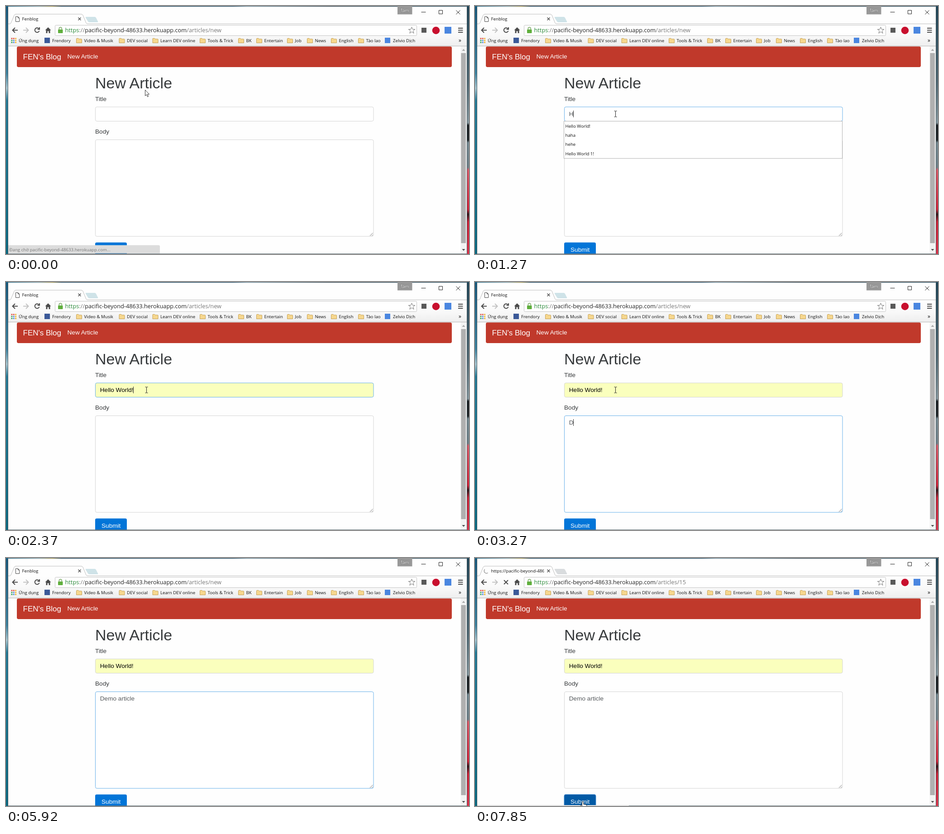
Write an HTML page that moves like this. It is 1023 px wide and 548 px high and loops after 7990 ms.

```html
<!DOCTYPE html>
<html lang="vi">
<head>
<meta charset="utf-8">
<title>Blog form</title>
<style>
  html, body { margin: 0; width: 100%; height: 100%; overflow: hidden; background: #fff; }
  svg { display: block; width: 100%; height: 100%; }
  text { white-space: pre; }
  .ui { font: 9.7px "Open Sans", "Noto Sans", sans-serif; fill: #111; }
  .url { font: 12.8px "Open Sans", "Noto Sans", sans-serif; fill: #777; }
  .page { font: 13.6px "Liberation Sans", Arial, sans-serif; fill: #373a3c; }
  .field { fill: #fff; stroke: #d4d4d4; stroke-width: 1; }
  .line { fill: none; stroke: #4a4a4a; }
</style>
</head>
<body>
<svg viewBox="0 0 1023 548" preserveAspectRatio="none">
  <defs>
    <linearGradient id="top">
      <stop offset="0" stop-color="#1d6f92"/><stop offset=".07" stop-color="#8fb5c0"/>
      <stop offset=".1" stop-color="#c2a340"/><stop offset=".12" stop-color="#123f5c"/>
      <stop offset=".49" stop-color="#1c4a66"/><stop offset=".52" stop-color="#7d9fb0"/>
      <stop offset=".7" stop-color="#33424c"/><stop offset="1" stop-color="#2b5568"/>
    </linearGradient>
    <linearGradient id="left" x2="0" y2="1">
      <stop offset="0" stop-color="#15567a"/><stop offset=".27" stop-color="#3a7f9c"/>
      <stop offset=".33" stop-color="#a5c2cc"/><stop offset=".38" stop-color="#237894"/>
      <stop offset="1" stop-color="#08677f"/>
    </linearGradient>
    <linearGradient id="right" x2="0" y2="1">
      <stop offset="0" stop-color="#1d4254"/><stop offset=".3" stop-color="#4d6570"/>
      <stop offset=".47" stop-color="#84959c"/><stop offset=".48" stop-color="#161a1d"/>
      <stop offset=".54" stop-color="#1d2225"/><stop offset=".55" stop-color="#74878f"/>
      <stop offset=".65" stop-color="#6d7f87"/><stop offset=".66" stop-color="#d65a68"/>
      <stop offset=".82" stop-color="#cf2339"/><stop offset=".84" stop-color="#2b1519"/>
      <stop offset=".87" stop-color="#c82237"/><stop offset="1" stop-color="#d83048"/>
    </linearGradient>
    <linearGradient id="bar" x2="0" y2="1">
      <stop offset="0" stop-color="#fefefe"/><stop offset=".5" stop-color="#f9f9f9"/>
      <stop offset="1" stop-color="#eeeeee"/>
    </linearGradient>
  </defs>

  <!-- desktop and window -->
  <rect width="1023" height="548" fill="url(#top)"/>
  <rect y="1" width="5" height="547" fill="url(#left)"/>
  <rect x="1018" y="1" width="5" height="547" fill="url(#right)"/>
  <rect x="4" y="1" width="1015" height="547" fill="#5b6b72"/>
  <rect x="5" y="1.5" width="1013" height="545.5" fill="#fefefe"/>

  <!-- title bar -->
  <rect x="865" width="32.500" height="18.500" fill="#989898"/>
  <text x="881" y="13" text-anchor="middle" class="ui" style="fill:#fff;stroke:#666;stroke-width:1;paint-order:stroke">Tâm</text>
  <path d="M917.500 13.500h10M956.500 9.500h8v8h-8zM994.500 9.500l9 9m0-9l-9 9" class="line" style="stroke:#222"/>

  <!-- tab and toolbar -->
  <rect x="5" y="40" width="1013" height="49" fill="url(#bar)"/>
  <path id="newTab" d="M177 24h19q2 0 3 2l4 8q1 2-1 2h-18q-2 0-3-2l-5-8q-1-2 1-2z"/>
  <path d="M5 39.500h3q2 0 3-2l7-17q1-2.500 4-2.500h144q3 0 4 2.500l7 17q1 2 3 2h838" fill="none" stroke="#bcbcbc"/>
  <rect x="10" y="39" width="167" height="2" fill="#fefefe"/>
  <path id="pageIcon" d="M21.500 23.500h5l3 3v8h-8zM26.500 23.500v3h3" class="line"/>
  <path id="spinner" d="M28.500 32.800A5.200 5.200 0 0 1 21.500 25.200" fill="none" stroke="#8a8a8a" stroke-width="1.400"/>
  <svg x="35.500" y="18" width="117" height="22"><text id="tabTitle" y="14" class="ui"/></svg>
  <path d="M159.500 25.500l6 6m0-6l-6 6" class="line" stroke-width="1.400"/>

  <g fill="none" stroke="#4a4a4a" stroke-width="2">
    <path d="M26 53.500H15M20 48l-5.500 5.500L20 59"/>
    <path d="M38 53.500h11M44 48l5.500 5.500L44 59" stroke="#c2c2c2"/>
    <path id="reload" d="M72.500 50A5 5 0 1 0 73.500 55M74 47v4.500h-4.500"/>
    <path id="stop" d="M64 49l9 9m0-9l-9 9"/>
    <path d="M999 49h10.500m-10.500 4.500h10.500m-10.500 4.500h10.500"/>
  </g>
  <path d="M93 47l6.500 6.500H97.500V60H94.500V55.500h-3V60H88.500V53.500H86.500z" fill="#4a4a4a"/>
  <rect x="108.500" y="42.500" width="799" height="23" rx="2" fill="#fff" stroke="#c4c4c4"/>
  <rect x="115" y="52" width="10.500" height="8" rx="1" fill="#5faf3c"/>
  <path d="M117.300 52v-2a3 3 0 0 1 6 0v2" fill="none" stroke="#7dab68" stroke-width="1.600"/>
  <text x="130.500" y="58" class="url"><tspan fill="#2b8a3a">https</tspan>://<tspan fill="#222">pacific-beyond-48633.herokuapp.com</tspan><tspan id="path"/></text>
  <path d="M896.500 46.500l2 5h5.200l-4.200 3.400 1.600 5.400-4.600-3.200-4.600 3.200 1.600-5.400-4.200-3.400h5.200z" class="line" style="stroke:#777"/>
  <rect x="918" y="48" width="11" height="11" fill="#595959"/>
  <circle cx="950" cy="54" r="8.300" fill="#c8102e"/>
  <rect x="969" y="46" width="15" height="15" fill="#4a86e0"/>

  <!-- bookmarks -->
  <g id="bookmarks"/>
  <text x="1000" y="80" class="ui" style="font-size:12px">»</text>
  <path d="M5 88.500h1013" stroke="#b4b4b4"/>

  <!-- page -->
  <rect x="24" y="89.500" width="961" height="45.500" rx="3.400" fill="#c0392b"/>
  <text x="37.500" y="117.500" class="page" style="font-size:17px;fill:#fff">FEN's Blog</text>
  <text x="135.500" y="116" class="page" style="fill:#fff">New Article</text>
  <text x="197" y="182" class="page" style="font-size:34px">New Article</text>
  <text x="197" y="210" class="page">Title</text>
  <text x="197" y="282" class="page">Body</text>
  <rect id="titleBox" x="197.500" y="223" width="614.500" height="31.500" rx="3.400" class="field"/>
  <rect id="bodyBox" x="197.500" y="295.500" width="614.500" height="213.500" rx="3.400" class="field"/>
  <path d="M804 508l6.500-6.500M808 508l2.500-2.500" class="line" style="stroke:#777"/>
  <text id="title" x="207.800" y="243" class="page"/>
  <text id="body" x="207.800" y="315" class="page" style="fill:#55595c"/>
  <g id="menu">
    <rect id="menuBox" x="196.500" y="254.500" width="615" fill="#fff" stroke="#b0b0b0"/>
    <rect id="pick" x="197" y="255" width="614.500" height="20.500" fill="#c8c8c8"/>
    <g id="rows"/>
  </g>
  <rect id="caret" width="1" height="15" fill="#333"/>
  <svg y="500" width="1023" height="47"><g transform="translate(0 -500)">
    <rect id="button" x="197" y="522.500" width="70" height="32.500" rx="3.400"/>
    <text x="211" y="543" class="page" style="fill:#fff">Submit</text>
  </g></svg>

  <!-- scrollbar -->
  <rect x="1004.500" y="89" width="13" height="458" fill="#f3f3f3"/>
  <rect x="1005.500" y="104" width="10.500" height="420" fill="#b0b0b0"/>
  <path d="M1007.500 99l3.500-4 3.500 4z" fill="#a5a5a5"/>
  <path d="M1007.500 537l3.500 4 3.500-4z" fill="#505050"/>

  <g id="bubble">
    <path d="M5 528.500h332q3 0 3 3v15H5z" fill="#dcdcdc"/>
    <text x="7.500" y="541.500" class="ui" style="fill:#777">Đang chờ pacific-beyond-48633.herokuapp.com...</text>
  </g>

  <!-- pointers, each with its hot spot at 0,0 -->
  <path id="arrow" d="M.5.5v13l3-2.800 2.200 5 2-1-2.100-4.700H9.500z" fill="#fff" stroke="#222" stroke-width=".9"/>
  <path id="beam" d="M-3-6.500h2.500l.5.500.5-.5H3M0-6V6M-3 6.500h2.500L0 6l.5.500H3" fill="none" stroke="#222"/>
  <path id="hand" d="M-1.500 1q1.500-2 3 0v5l5.500 1q2 .5 2 2.500v5H-1.500L-5 9q0-2 2-1l1.500 1.500z" fill="#fff" stroke="#222" stroke-width=".9"/>
</svg>

<script>
const $ = id => document.getElementById(id);
const LOOP = 7990, TEXT_X = 207.8;
const pen = document.createElement('canvas').getContext('2d');
pen.font = '13.6px "Liberation Sans", Arial, sans-serif';

function add(parent, tag, attrs, text) {
  const el = document.createElementNS('http://www.w3.org/2000/svg', tag);
  for (const k in attrs) el.setAttribute(k, attrs[k]);
  if (text) el.textContent = text;
  parent.append(el);
  return el;
}

const marks = $('bookmarks');
const label = (x, s) => add(marks, 'text', { x, y: 80, class: 'ui' }, s);
const square = (x, fill) => add(marks, 'rect', { x, y: 70, width: 12, height: 12, fill });
const dots = ['#e04a3f', '#e04a3f', '#f0b428', '#3aa757', '#4a86e0', '#f0b428', '#3aa757', '#4a86e0', '#f0b428'];
dots.forEach((fill, i) => add(marks, 'rect',
  { x: 11.5 + i % 3 * 4.3, y: 70.5 + Math.floor(i / 3) * 4.3, width: 2.8, height: 2.8, fill }));
label(28, 'Ứng dụng');
square(85, '#3b5998');
label(102, 'Frendory');
[[155, 'Video & Musik'], [249.5, 'DEV social'], [323.5, 'Learn DEV online'], [428, 'Tools & Trick'],
 [513, 'BK'], [553, 'Entertain'], [621, 'Job'], [665, 'News'], [718, 'English'], [778, 'Tào lao']
].forEach(([x, s]) => {
  add(marks, 'path', { d: `M${x + .5} 81.500v-9q0-1 1-1h3.500l1.500 1.500h5q1 0 1 1v7.500z`,
    fill: '#f6d78e', stroke: '#c09a50', 'stroke-width': .9 });
  label(x + 17.5, s);
});
square(837, '#4a86e0');
label(855, 'Zelvio Dịch');

// Each step changes part of the state and keeps the rest.
const steps = [
  [0, { bubble: 1, drop: 0, pointer: ['arrow', 307, 185], title: '', body: '', focus: '', caret: 0, rows: [],
        pick: 0, filled: 0, button: '#0275d8', ring: 0, loading: 0, turn: 0, moved: 0 }],
  [120, { bubble: .15, pointer: ['arrow', 308, 188] }],
  [340, { bubble: .1, pointer: ['arrow', 309, 203] }],
  [460, { bubble: .05, pointer: ['arrow', 309, 221] }],
  [580, { bubble: 0, pointer: ['beam', 310.5, 239.5] }],
  [720, { pointer: ['beam', 310.5, 238.5] }],
  [1000, { focus: 'title', caret: 1 }],
  [1270, { title: 'H', rows: ['Hello World!', 'haha', 'hehe', 'Hello World 1!'] }],
  [1420, { title: 'He', rows: ['Hello World!', 'hehe', 'Hello World 1!'] }],
  [1820, { caret: 0 }],
  [2070, { pick: 1 }],
  [2230, { title: 'Hello World!', filled: 1 }],
  [2370, { rows: [], pick: 0, caret: 1 }],
  [2650, { focus: 'body' }],
  [3150, { caret: 0 }],
  ...[3270, 3550, 3670, 4070, 4190, 4590, 4710, 4860, 4980, 5100, 5220, 5370]
    .map((t, i) => [t, { body: 'Demo article'.slice(0, i + 1), caret: 1 }]),
  [5650, { pointer: ['beam', 304.5, 246] }],
  [5800, { pointer: ['beam', 297, 283] }],
  [5920, { pointer: [], caret: 0 }],
  [6390, { pointer: ['hand', 238, 540], caret: 1 }],
  [6530, { pointer: ['hand', 238, 538], button: '#0267be' }],
  [6650, { button: '#025aa5' }],
  [6960, { focus: '', caret: 0, button: '#014682', ring: 1, loading: 1, turn: 315 }],
  [7080, { button: '#01508f', turn: 270 }],
  [7200, { button: '#025aa5', turn: 225 }],
  [7360, { bubble: 1, drop: 17.5, turn: 180 }],
  [7480, { turn: 135 }],
  [7600, { moved: 1, turn: 90 }],
  [7720, { turn: 45 }],
  [7850, { turn: 0 }]
];

const show = (id, on) => { $(id).style.display = on ? '' : 'none'; };
const set = (id, attrs) => { for (const k in attrs) $(id).setAttribute(k, attrs[k]); };

function draw(s) {
  set('bubble', { opacity: s.bubble, transform: `translate(0 ${s.drop})` });
  for (const id of ['arrow', 'beam', 'hand']) {
    const on = s.pointer[0] === id;
    show(id, on);
    if (on) set(id, { transform: `translate(${s.pointer[1]} ${s.pointer[2]})` });
  }
  for (const id of ['title', 'body']) {
    $(id).textContent = s[id];
    $(id + 'Box').style.stroke = s.focus === id ? '#66afe9' : '';
  }
  $('titleBox').style.fill = s.filled ? '#faffbd' : '#fff';
  $('title').style.fill = s.filled ? '#000' : '#55595c';

  show('caret', s.caret);
  if (s.caret) set('caret', {
    x: Math.floor(TEXT_X + pen.measureText(s[s.focus]).width),
    y: s.focus === 'title' ? 231 : 303
  });

  show('menu', s.rows.length);
  show('pick', s.pick);
  set('menuBox', { height: s.rows.length * 20.2 + 1.5 });
  $('rows').replaceChildren();
  s.rows.forEach((r, i) => add($('rows'), 'text', { x: 199.5, y: 269 + i * 20.2, class: 'ui' }, r));

  set('button', { fill: s.button, stroke: s.ring ? '#4f94d4' : 'none' });
  show('pageIcon', !s.loading);
  show('reload', !s.loading);
  show('spinner', s.loading);
  show('stop', s.loading);
  set('spinner', { transform: `rotate(${s.turn} 25 29)` });
  $('tabTitle').textContent = s.moved ? 'https://pacific-beyond-48633' : 'Fenblog';
  $('path').textContent = s.moved ? '/articles/15' : '/articles/new';
  set('newTab', { fill: s.moved ? '#d9dcde' : '#cfe3e8' });
}

const start = performance.now();
let last = -1;
function tick() {
  const t = Math.max(0, performance.now() - start) % LOOP;
  const past = steps.filter(step => step[0] <= t);
  if (past.length !== last) {
    last = past.length;
    draw(Object.assign({}, ...past.map(step => step[1])));
  }
  requestAnimationFrame(tick);
}
tick();
</script>
</body>
</html>
```
